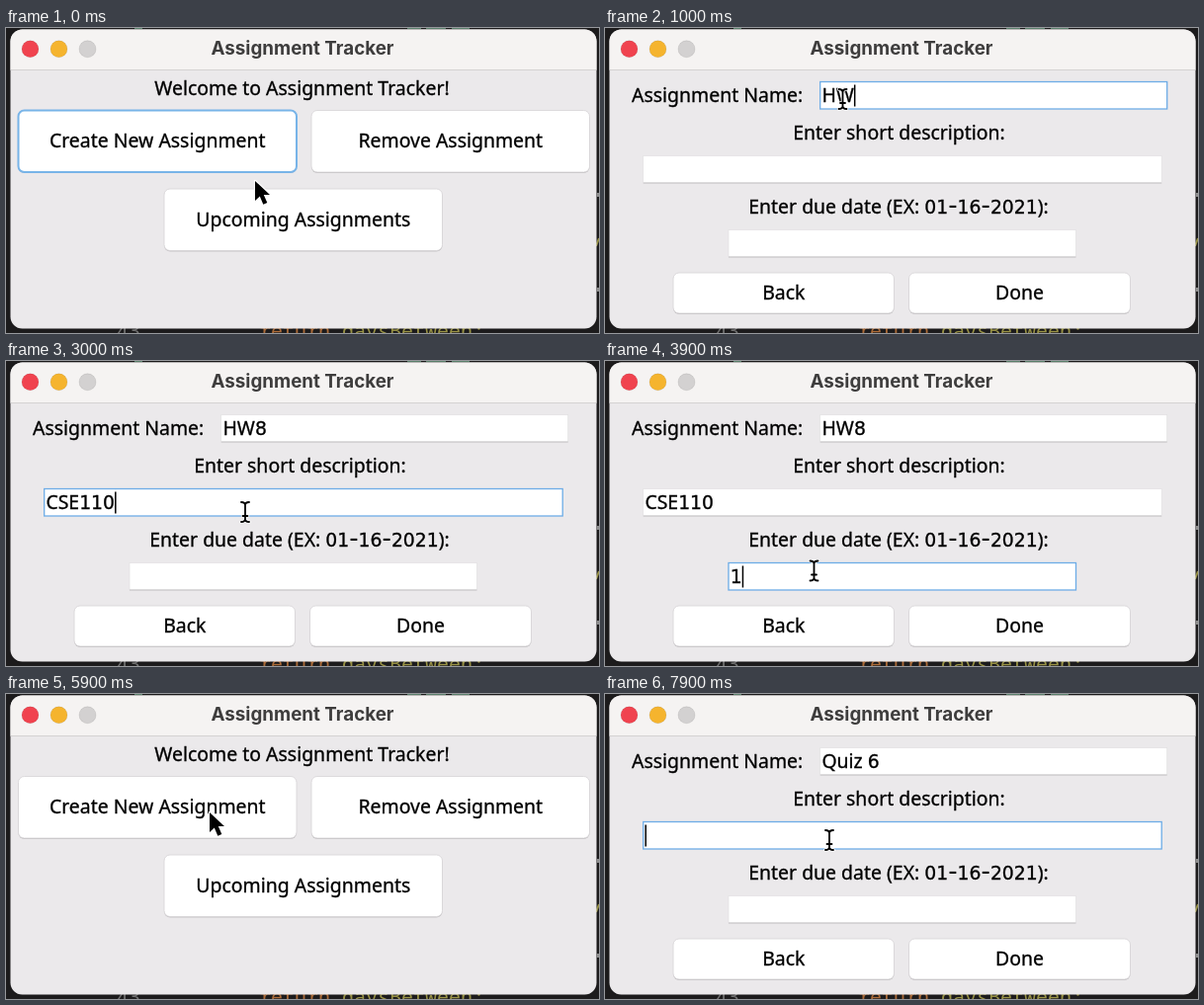
Recreate the animation shown at these times as an HTML page. Size 600 by 309 pixels, loop 8000 ms.

```html
<!DOCTYPE html>
<html lang="en">
<head>
<meta charset="utf-8">
<title>Assignment Tracker</title>
<style>
  html, body { margin: 0; height: 100%; overflow: hidden; background: #1c1b1c; }
  svg { display: block; width: 100vw; height: 100vh; }
  text { font: 19.45px "Noto Sans", "Open Sans", sans-serif; fill: #000; stroke: #000; stroke-width: .3; white-space: pre; }
  .num { font: 18.8px "DejaVu Sans", sans-serif; }
  .dash { font: 26px "DejaVu Sans", sans-serif; stroke: none; }
  .mid { text-anchor: middle; }
  .title { font: 700 18.8px Inter, sans-serif; fill: #3e3d3d; stroke: none; }
  .code { font: 20px "Noto Sans Mono", monospace; stroke: none; }
  .light { stroke: #0002; stroke-width: .6; }
</style>
</head>
<body>
<svg viewBox="0 0 600 309">
  <rect width="600" height="309" fill="#1c1b1c"/>
  <g opacity=".8">
    <text class="code" x="112" y="314" style="fill:#888">43</text>
    <text class="code" x="256" y="314" style="fill:#d08040">return</text>
    <text class="code" x="340" y="314" style="fill:#b8b050">daysBetween;</text>
    <path d="M130 .5h8M406 .5h14m5 0h20m6 0h18" stroke="#6a9a80"/>
    <path d="M599 167v4m0 92v4" stroke="#aaa" stroke-width="2"/>
    <path d="M597 221l3-8" stroke="#b8b050" stroke-width="2"/>
  </g>
  <rect x="4.5" y="1.5" width="593" height="303" rx="12" fill="#ebe9eb"/>
  <path d="M4.5 42V13.5a12 12 0 0 1 12-12h569a12 12 0 0 1 12 12V42z" fill="#f5f3f2"/>
  <path d="M4.5 42.5h593" stroke="#d4d2d2"/>
  <circle class="light" cx="24.5" cy="21.3" r="8.5" fill="#f0434f"/>
  <circle class="light" cx="53.5" cy="21.3" r="8.5" fill="#f5b42e"/>
  <circle class="light" cx="82.5" cy="21.3" r="8.5" fill="#d3d1d1"/>
  <text class="mid title" x="300" y="27">Assignment Tracker</text>
  <g id="home"></g>
  <g id="form"></g>
  <path id="caret" stroke="#000" stroke-width="1.5"/>
  <path id="arrow" d="M0 0V20L4.8 15.5 8.3 23.7 12.3 22 8.8 14H15z" stroke="#fff" stroke-width="2.4" stroke-linejoin="round" paint-order="stroke"/>
  <g id="beam" fill="none" stroke-linecap="round">
    <path id="stem" d="M-4-10Q0-10 0-7Q0-10 4-10M0-7V7M-4 10Q0 10 0 7Q0 10 4 10M-2.5 4H2.5"/>
  </g>
</svg>
<script>
const $ = id => document.getElementById(id);

function set(el, attrs) {
  for (const k in attrs) el.setAttribute(k, attrs[k]);
  return el;
}

function add(parent, tag, attrs) {
  return set(parent.appendChild(document.createElementNS('http://www.w3.org/2000/svg', tag)), attrs);
}

// Digits and hyphens get wider glyphs.
function setText(el, s) {
  if (el.dataset.s === s) return;
  el.dataset.s = s;
  el.textContent = '';
  for (const part of s.match(/\d+|-|[^\d-]+/g) || []) {
    const cls = part === '-' ? 'dash' : /\d/.test(part) ? 'num' : '';
    add(el, 'tspan', { class: cls }).textContent = part;
  }
}

function label(parent, s, x, y, cls = 'mid') {
  const el = add(parent, 'text', { x, y, class: cls });
  setText(el, s);
  return el;
}

function button(parent, s, x, y, width, height) {
  add(parent, 'rect', { x, y: y + 1, width, height, rx: 6, fill: '#c4c2c4' });
  const face = add(parent, 'rect', { x, y, width, height, rx: 6, fill: '#fff', stroke: '#d6d4d6', 'stroke-width': .8 });
  label(parent, s, x + width / 2, y + height / 2 + 6.5);
  return face;
}

function field(x, y, width, height) {
  const box = add(form, 'rect', { x, y, width, height, fill: '#fff' });
  const base = add(form, 'path', { d: `M${x} ${y + height}h${width}`, stroke: '#c2c0c2' });
  return { x, y, width, height, box, base, text: label(form, '', x + 1.7, y + 20.5, '') };
}

const home = $('home'), form = $('form');
label(home, 'Welcome to Assignment Tracker!', 299.5, 68);
const create = button(home, 'Create New Assignment', 12.5, 83.5, 281.5, 62.5);
button(home, 'Remove Assignment', 309, 83.5, 281.5, 62.5);
button(home, 'Upcoming Assignments', 160, 163, 281.5, 62.5);

label(form, 'Assignment Name:', 27, 75, '');
label(form, 'Enter short description:', 297.5, 112.5);
label(form, 'Enter due date (EX: 01-16-2021):', 297, 188);
button(form, 'Back', 69, 248, 223.5, 41);
const done = button(form, 'Done', 307.5, 248, 224, 41);
const fields = [field(217.7, 54.5, 351, 27.5), field(38.7, 129.5, 524.5, 27.5), field(125, 204.5, 351.5, 27.5)];

// [time, focused field, its text]; -1 opens the home page, 3 is the form without focus
const log = [
  [0, -1], [500, 3], [800, 0, ''], [900, 0, 'H'], [1000, 0, 'HW'], [1300, 0, 'HW8'],
  [2000, 1, ''], [2400, 1, 'C'], [2600, 1, 'CS'], [2700, 1, 'CSE'], [2800, 1, 'CSE11'], [2900, 1, 'CSE110'],
  [3600, 2, ''], [3900, 2, '1'], [4100, 2, '12'], [4200, 2, '12-'], [4400, 2, '12-3'], [4500, 2, '12-3-'],
  [4600, 2, '12-3-2'], [4700, 2, '12-3-20'], [4800, 2, '12-3-202'], [4900, 2, '12-3-2021'],
  [5700, -1], [6100, 3], [6300, 0, ''], [6500, 0, 'Q'], [6800, 0, 'Qui'], [6900, 0, 'Quiz '], [7100, 0, 'Quiz 6'],
  [7500, 1, '']
];

// Pointer stops: [time, x, y]
const route = [
  [0, 252, 155], [300, 205, 120], [500, 205, 120], [800, 240.5, 72], [1400, 240.5, 72], [1900, 242, 153],
  [3100, 242, 153], [3400, 211.5, 212.5], [4800, 211.5, 212.5], [5300, 320, 257], [5400, 335, 264], [5700, 335, 264],
  [5900, 206, 120], [6100, 206, 120], [6300, 228, 71], [7200, 228, 71], [7500, 227, 148], [8000, 227, 148]
];

function pointer(t) {
  const i = route.findIndex(p => p[0] > t);
  const [t0, x0, y0] = route[i - 1], [t1, x1, y1] = route[i];
  const u = (t - t0) / (t1 - t0), k = u * u * (3 - 2 * u);
  return [x0 + (x1 - x0) * k, y0 + (y1 - y0) * k];
}

const show = (el, on) => set(el, { visibility: on ? 'visible' : 'hidden' });

function draw(t) {
  let focus, since, texts;
  for (const [at, f, s] of log) {
    if (at > t) break;
    if (f < 0) texts = ['', '', ''];
    else if (f < 3) texts[f] = s;
    focus = f;
    since = at;
  }
  const onForm = focus >= 0;
  show(home, !onForm);
  show(form, onForm);

  const ring = t < 500;
  set(create, {
    stroke: ring ? '#78b4e8' : '#d6d4d6',
    'stroke-width': ring ? 2 : .8,
    fill: t === 400 || t === 6000 ? '#e4e2e4' : '#fff'
  });
  set(done, { fill: t >= 5500 && t < 5700 ? '#e4e2e4' : '#fff' });

  fields.forEach((f, i) => {
    const active = i === focus;
    set(f.box, { stroke: active ? '#6dace6' : '#e2e0e2', 'stroke-width': active ? 1.3 : .7 });
    show(f.base, onForm && !active);
    setText(f.text, texts[i]);
  });

  const f = fields[focus];
  show($('caret'), f && (t - since) % 1000 < 500);
  if (f) {
    const w = texts[focus] ? f.text.getComputedTextLength() : 0;
    set($('caret'), { d: `M${f.x + 2.5 + w} ${f.y + 3}v22` });
  }

  const [x, y] = pointer(t);
  const over = onForm && fields.some(f => x > f.x && x < f.x + f.width && y > f.y && y < f.y + f.height);
  for (const id of ['arrow', 'beam']) {
    set($(id), { transform: `translate(${x} ${y})` });
    show($(id), (id === 'beam') === over);
  }
}

// White edge below, black core on top
const core = $('stem').cloneNode();
set($('stem'), { stroke: '#fff', 'stroke-width': 3.6 });
$('beam').append(set(core, { id: 'core', stroke: '#000', 'stroke-width': 1.8 }));

const start = performance.now();
(function tick() {
  draw(Math.floor((performance.now() - start) % 8000 / 100) * 100);
  requestAnimationFrame(tick);
})();
</script>
</body>
</html>
```
